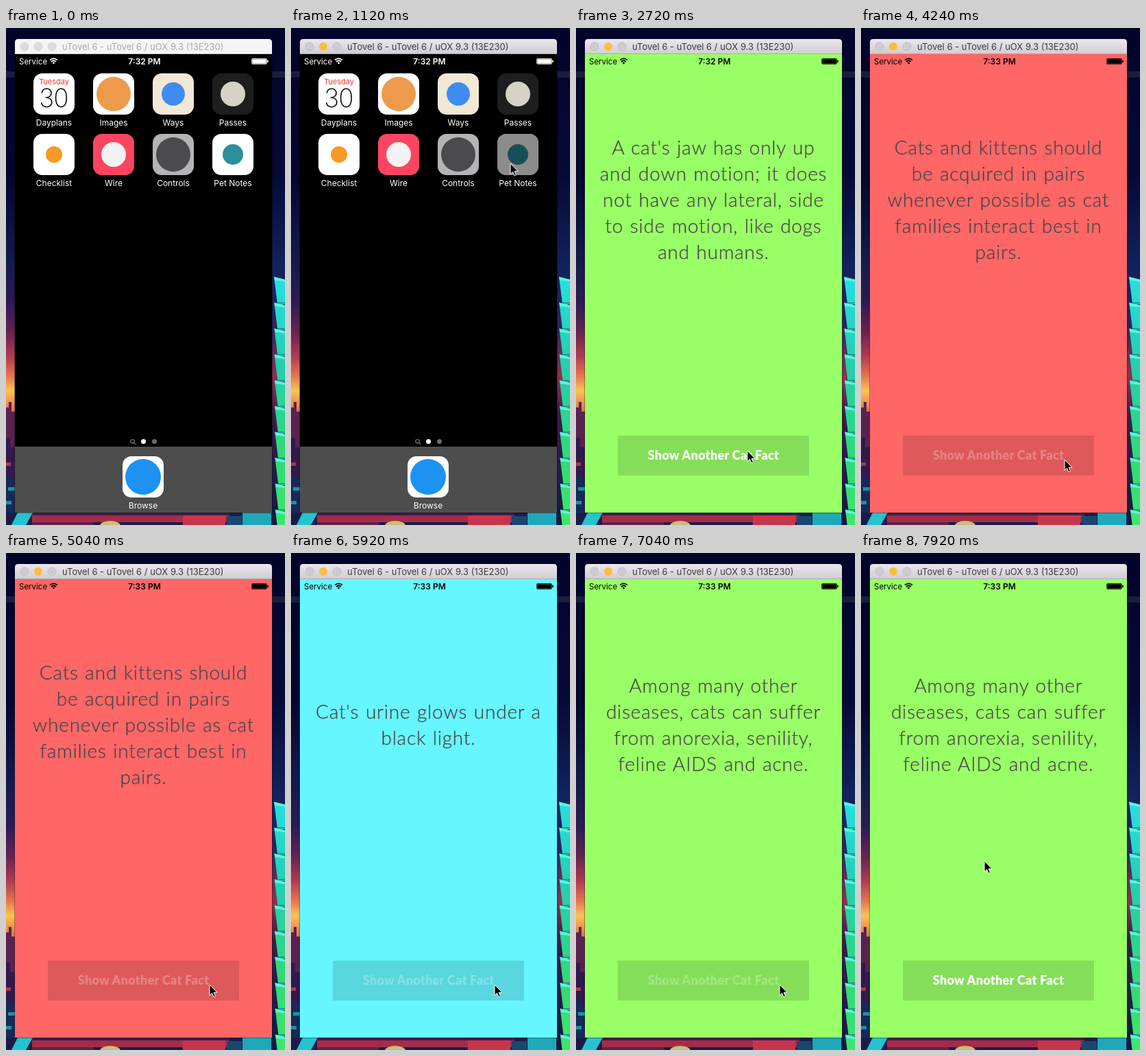
An HTML page for the animation above (8 s loop, 407 by 723 pixels).

```html
<!DOCTYPE html>
<html lang="en">
<head>
<meta charset="utf-8">
<style>
html, body { margin: 0; width: 100%; height: 100%; overflow: hidden; background: #04052b; }
svg { display: block; width: 100vw; height: 100vh; }
text { font: 12px Inter, sans-serif; }
.mid { text-anchor: middle; }
.fact { font: 300 28px Lato, sans-serif; letter-spacing: .8px; word-spacing: 1.2px; fill: #474747; stroke: #474747; stroke-width: .3px; }
.btn { font: 900 18px Lato, sans-serif; letter-spacing: .3px; fill: #fff; }
.clock { font-weight: 600; }
.title { font-size: 13px; }
.day { font-size: 11px; fill: #f33b30; }
.date { font-size: 37px; font-weight: 200; fill: #111; letter-spacing: -1px; }
.net { font-size: 11.5px; }
</style>
</head>
<body>
<svg viewBox="0 0 407 723" preserveAspectRatio="none">
  <defs>
    <linearGradient id="west" x2="0" y2="1">
      <stop offset="0" stop-color="#03042a"/><stop offset=".3" stop-color="#04062f"/>
      <stop offset=".46" stop-color="#131a4c"/><stop offset=".55" stop-color="#2c1b55"/>
      <stop offset=".61" stop-color="#642353"/><stop offset=".66" stop-color="#b03a52"/>
      <stop offset=".7" stop-color="#e8744f"/><stop offset=".73" stop-color="#fbc352"/>
      <stop offset=".78" stop-color="#d8604f"/><stop offset="1" stop-color="#4a1d4c"/>
    </linearGradient>
    <linearGradient id="east" x2="0" y2="1">
      <stop offset="0" stop-color="#03042a"/><stop offset=".3" stop-color="#060a37"/>
      <stop offset=".48" stop-color="#12225c"/><stop offset=".6" stop-color="#29265f"/>
      <stop offset=".7" stop-color="#8c3352"/><stop offset=".78" stop-color="#3a1c4a"/>
      <stop offset="1" stop-color="#101a44"/>
    </linearGradient>
    <linearGradient id="tower" gradientUnits="userSpaceOnUse" x1="0" y1="362" x2="0" y2="723">
      <stop offset="0" stop-color="#27dfe0"/><stop offset=".35" stop-color="#23cfae"/>
      <stop offset=".75" stop-color="#2fdc72"/><stop offset="1" stop-color="#3ce86a"/>
    </linearGradient>
    <linearGradient id="bar" x2="0" y2="1">
      <stop offset="0" stop-color="#ebe7ec"/><stop offset="1" stop-color="#d0cdd2"/>
    </linearGradient>
    <clipPath id="screen"><path d="M13 38h375v667H13z"/></clipPath>
  </defs>
  <g id="desk"></g>
  <g id="view"></g>
</svg>
<script>
const LOOP = 8000, STEP = 80, LAUNCH = 1240, DIM = .25;
const $ = id => document.getElementById(id);
const rect = (x, y, w, h, fill, more = '') =>
  `<rect x="${x}" y="${y}" width="${w}" height="${h}" fill="${fill}" ${more}/>`;
const dot = (x, y, r, fill, more = '') =>
  `<circle cx="${x}" cy="${y}" r="${r}" fill="${fill}" ${more}/>`;
const text = (s, x, y, cls = '', more = '') =>
  `<text x="${x}" y="${y}" class="${cls}" ${more}>${s}</text>`;

// fact: background, lines
const facts = [
  ['#99ff66', "A cat's jaw has only up", 'and down motion; it does', 'not have any lateral, side',
    'to side motion, like dogs', 'and humans.'],
  ['#ff6666', 'Cats and kittens should', 'be acquired in pairs', 'whenever possible as cat',
    'families interact best in', 'pairs.'],
  ['#66f6ff', "Cat's urine glows under a", 'black light.'],
  ['#99ff66', 'Among many other', 'diseases, cats can suffer', 'from anorexia, senility,',
    'feline AIDS and acne.']
];
// press time, release time, next fact
const presses = [[3360, 3520, 2], [4160, 4240, 1], [5040, 5200, 2], [5920, 6160, 1], [6880, 7040, 3]];
// time, x, y of the pointer
const path = [[240, 404, 520], [1120, 320, 197], [2080, 320, 197], [2720, 250, 615],
  [2960, 299, 633], [3120, 297, 628], [7600, 297, 628], [7920, 180, 448]];
// label, tile, mark colour, mark radius
const apps = [['Dayplans', '#fff'], ['Images', '#fff', '#ee9a4d', 25], ['Ways', '#f1e8d6', '#3f8cf0', 17],
  ['Passes', '#1e1e1e', '#d6d2c6', 18], ['Checklist', '#fff', '#f59a23', 12], ['Wire', '#fc4560', '#f3f1f1', 18],
  ['Controls', '#b4b4b6', '#4b4b4d', 25], ['Pet Notes', '#fff', '#2b8f9c', 15]];

function desktop() {
  let s = rect(0, 0, 200, 723, 'url(#west)') + rect(200, 0, 207, 723, 'url(#east)') +
    rect(0, 63, 407, 9, '#1b1d3d');
  for (let i = 0; i < 10; i++) {
    const y = 362 + i * 37.6, x = 391 + i * .2;
    s += `<path d="M${x} ${y}l16 4v36h-11z" fill="url(#tower)"/>
      <path d="M${x} ${y}l16 4v3l-15-2z" fill="#5ff2dd"/>
      <path d="M${x + 5} ${y + 38}h12" stroke="#138d83" stroke-width="1.5"/>`;
  }
  s += '<path d="M0 578V552h4v-8h4v14h5v165H0z" fill="#5a2250"/>' +
    '<path d="M0 723V596h6v14h7v113z" fill="#33194c"/>' +
    '<path d="M0 723V650l13 8v65z" fill="#152a5a"/>' +
    rect(0, 632, 7, 5, '#a93850') + rect(3, 668, 10, 5, '#1f8fa4') + rect(0, 688, 8, 5, '#1f8fa4');
  return s + rect(0, 705, 390, 18, '#1a1c48') + rect(38, 705, 288, 4, '#3c1c4a') + rect(38, 709, 288, 10, '#a52c48') +
    rect(38, 719, 90, 4, '#5c2347') + rect(258, 709, 62, 14, '#c7354c') + rect(345, 705, 42, 18, '#1fa9b8') +
    rect(322, 710, 22, 13, '#1a4770') + '<path d="M8 723L17 705h22l-10 18z" fill="#24c3cf"/>' +
    '<ellipse cx="152" cy="724" rx="15" ry="7" fill="#c9bd7c"/>' +
    rect(12, 37, 377, 669, '#000', 'opacity=".35" rx="2"');
}

function titleBar(active) {
  const gray = active ? '#cfccd1' : '#dddbdd', edge = `stroke="${active ? '#b9b6bb' : '#cfcdcf'}" stroke-width=".7"`;
  return `<path d="M13 38V21q0-5 5-5h365q5 0 5 5v17z" fill="${active ? 'url(#bar)' : '#f6f5f6'}"/>` +
    rect(13, 37, 375, 1, active ? '#b0adb2' : '#d6d4d6') +
    dot(27, 27, 6, gray, edge) + dot(47, 27, 6, active ? '#fdbc40' : gray, active ? '' : edge) + dot(67, 27, 6, gray, edge) +
    text('uTovel 6 - uTovel 6 / uOX 9.3 (13E230)', 82, 32, 'title', `fill="${active ? '#3c3a3d' : '#aaa8aa'}"`);
}

function status(color, clock) {
  return `<g fill="${color}">` + text('Service', 19, 52.5, 'net') +
    `<g fill="none" stroke="${color}" stroke-width="1.7"><path d="M64 46.6q5.5-4.6 11 0M66 49q3.5-3 7 0"/></g>
    <path d="M67.5 50.5q2-1.6 4 0l-2 2.3z"/>` +
    text(clock, 202, 52.5, 'mid clock') +
    rect(358.5, 44.5, 22, 8, 'none', `rx="1.5" stroke="${color}" stroke-width=".8"`) +
    rect(359.3, 45.3, 20.4, 6.4, color) + rect(381.3, 46.7, 1.5, 3.6, color, 'rx=".7"') + '</g>';
}

function icon([label, tile, mark, r], x, y) {
  return rect(x, y, 60, 60, tile, 'rx="13"') + (mark ? dot(x + 30, y + 30, r, mark) : '') +
    text(label, x + 30, y + 76, 'mid', 'fill="#fff"');
}

function home(pressed) {
  return apps.map((a, i) => icon(a, 40 + i % 4 * 87, i < 4 ? 66 : 154)).join('') +
    text('Tuesday', 70, 82, 'mid day') + text('30', 69.5, 115, 'mid date') +
    (pressed ? rect(301, 154, 60, 60, '#000', 'rx="13" opacity=".45"') : '') +
    '<path d="M186.6 603.4l2.6 2.6" stroke="#777" stroke-width="1.3"/>' +
    dot(184.5, 601.3, 2.8, 'none', 'stroke="#777" stroke-width="1.2"') +
    dot(200.5, 601.5, 3.5, '#fff') + dot(216.5, 601.5, 3.5, '#6a6a6a') +
    rect(13, 609, 375, 96, '#4d4d4d') + icon(['Browse', '#fff', '#1c93f2', 26], 170, 623);
}

function factScreen(t) {
  let fact = 0, alpha = 1;
  for (const [down, up, next] of presses) {
    if (t >= down) alpha = DIM;
    if (t >= up) { fact = next; alpha = Math.min(1, DIM + (1 - DIM) * (t - up) / 400); }
  }
  const [color, ...lines] = facts[fact];
  return rect(13, 38, 375, 667, color) + status('#000', t < 3520 ? '7:32 PM' : '7:33 PM') +
    lines.map((s, i) => text(s, 200.5, 260 + (i - (lines.length - 1) / 2) * 38.2, 'mid fact')).join('') +
    rect(61, 593, 279, 58, '#000', 'opacity=".13"') +
    text('Show Another Cat Fact', 200.5, 628, 'mid btn', `opacity="${alpha}"`);
}

// critically damped spring from 0 to 1
const spring = x => 1 - (1 + x) * Math.exp(-x);
const mix = (a, b, p) => a + (b - a) * p;

function phone(t) {
  if (t >= 2080) return factScreen(t);
  let s = rect(13, 38, 375, 667, '#000');
  const dt = Math.max(0, t - LAUNCH), p = spring(dt * .0154), q = spring(dt * .0137);
  const left = mix(301, 13, p), top = mix(154, 38, p);
  const w = mix(361, 388, p) - left, h = mix(214, 705, q) - top, zoom = w / 60;
  const fade = Math.max(0, 1 - dt / 300);
  s += `<g opacity="${fade}"><g transform="translate(${left - 301 * zoom} ${top - 154 * zoom}) scale(${zoom})">` +
    home(t >= 1120) + '</g>' + status('#fff', '7:32 PM') + '</g>';
  if (dt) {
    const sx = w / 375, sy = h / 667;
    s += `<g opacity="${Math.min(1, (t - 1200) / 240)}" transform="matrix(${sx} 0 0 ${sy} ${left - 13 * sx} ${top - 38 * sy})">` +
      factScreen(t) + '</g>';
  }
  return s;
}

function pointer(t) {
  if (t < 320) return '';
  const i = path.findIndex(k => k[0] >= t), b = path[i] || path.at(-1), a = path[i - 1] || b;
  const u = a === b ? 1 : (t - a[0]) / (b[0] - a[0]), e = u * u * (3 - 2 * u);
  return `<path transform="translate(${mix(a[1], b[1], e)} ${mix(a[2], b[2], e)})"
    d="M0 0v15.5l3.5-3.3 2.4 5.6 2.6-1.1-2.4-5.4h4.9z" fill="#000" stroke="#fff"/>`;
}

$('desk').innerHTML = desktop();
let shown = -1;
function draw(now) {
  const t = Math.floor(now % LOOP / STEP) * STEP;
  if (t !== shown) {
    shown = t;
    $('view').innerHTML = titleBar(t >= 1120) + `<g clip-path="url(#screen)">${phone(t)}</g>` + pointer(t);
  }
  requestAnimationFrame(draw);
}
draw(performance.now());
</script>
</body>
</html>
```
